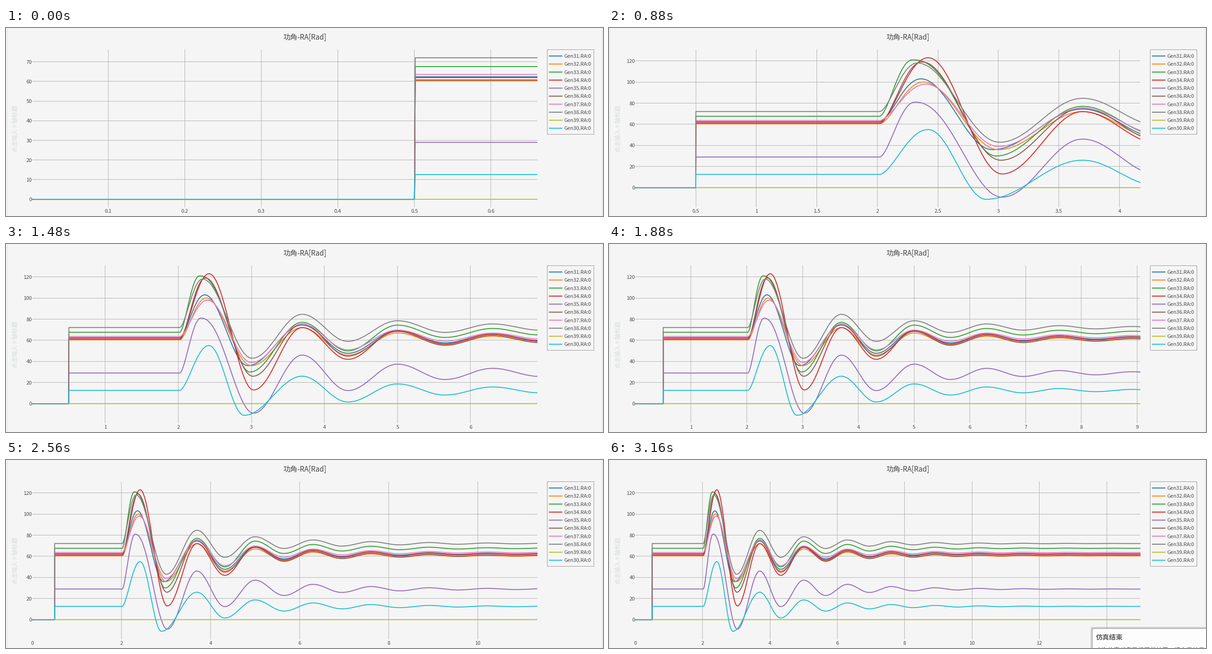
Animation, 1280 px wide and 404 px high, one loop 3240 ms. Source, as a matplotlib script:

```python
import math

import matplotlib.pyplot as plt
import numpy as np
from matplotlib.animation import FuncAnimation
from matplotlib.patches import FancyBboxPatch, Rectangle

W, H, DPI = 1280, 404, 100
PX = 72 / DPI
LEFT, RIGHT, TOP, BOTTOM = 56.5, 1138.5, 47, 385
FRAMES, LAST = 81, 79
BACK, GRID, INK = "#f5f5f5", "#b0b0b0", "#4a4a4a"

T0, STEP, FAULT = 0.001, 0.5, 2.02
SECOND_PEAK, SECOND_DIP, RINGING, HALF_PERIOD = 3.695, 4.32, 5.0, 0.65
DECAY = 0.727

# steady angle, first peak (time, angle), first dip (time, angle), second peak, second dip
GENERATORS = {
    "Gen31": (62.4, (2.36, 103), (2.95, 36), 74.4, 47.7),
    "Gen32": (60.4, (2.38, 100), (3.00, 36), 72, 46),
    "Gen33": (67.6, (2.29, 121), (2.98, 30), 77, 50),
    "Gen34": (62.0, (2.42, 123), (3.03, 13), 72, 42),
    "Gen35": (29.0, (2.31, 81), (3.03, -9), 46, 12.4),
    "Gen36": (60.8, (2.37, 119), (3.02, 26), 75.5, 45),
    "Gen37": (63.6, (2.40, 98), (3.00, 39), 75.3, 51),
    "Gen38": (72.1, (2.33, 118), (3.01, 43), 84.6, 59),
    "Gen39": (0, (2.40, 0), (3.00, 0), 0, 0),
    "Gen30": (12.6, (2.42, 55), (2.90, -11), 26, 1.6),
}


def rotor_angle(t, base, peak, dip, peak2, dip2):
    """Step up, then swing from extreme to extreme with cosine easing."""
    n = np.arange(18)
    ring = (peak2 - dip2) / 4
    times = np.r_[FAULT, peak[0], dip[0], SECOND_PEAK, SECOND_DIP, RINGING + HALF_PERIOD * n]
    angles = np.r_[base, peak[1], dip[1], peak2, dip2, base + ring * (-DECAY) ** n]
    skew = np.ones(len(times))
    skew[0] = 0.83                                # fast start after the fault
    skew[1] = 1 + 5 * max(0, 2.33 - peak[0])      # early peaks linger
    phase = np.interp(t, times, np.arange(len(times)))
    leg = np.minimum(phase.astype(int), len(times) - 2)
    ease = (1 - np.cos(np.pi * (phase - leg) ** skew[leg])) / 2
    swing = angles[leg] + (angles[leg + 1] - angles[leg]) * ease
    return np.where(t <= STEP, 0, swing)


def end_time(i):
    return np.interp(i, [0, 9, 22, 37, 47, 64, LAST],
                     [0.66, 2.21, 4.17, 6.91, 9.05, 11.33, 14.99])


def ticks(lo, hi, count):
    rough = (hi - lo) / count
    base = 10 ** math.floor(math.log10(rough))
    step = base * next(m for m in (2, 5, 10) if rough <= m * base * (1 + 1e-9))
    slack = 1e-4 * (hi - lo)
    first, last = math.ceil((lo - slack) / step), math.floor((hi + slack) / step)
    return [n * step for n in range(first, last + 1)]


fig = plt.figure(figsize=(W / DPI, H / DPI), dpi=DPI, facecolor=BACK)
plt.rcParams["font.family"] = ["Noto Sans CJK JP", "DejaVu Sans"]
ax = fig.add_axes([0, 0, 1, 1])
ax.set(xlim=(0, W), ylim=(H, 0))
ax.axis("off")


def label(x, y, text, size=11, color=INK, ha="left", **kw):
    """Text whose capitals are centred on y."""
    return ax.text(x, y + 0.366 * size, text, fontsize=size * PX, color=color,
                   ha=ha, va="baseline", **kw)


def stroke(x, y, color, width, **kw):
    return ax.plot(x, y, color=color, lw=width * PX, snap=False, **kw)[0]


for edge in (2.5, 1278.5):
    stroke([edge, edge], [0, H], "#e2e2e2", 1)
label(641, 19, "功角-RA[Rad]", 15.3, "#444444", "center")
ax.text(20, 216.5, "点击输入 Y 轴标题", fontsize=12.6 * PX, color="#d3ddd6",
        rotation=90, ha="center", va="center")

ax.add_patch(Rectangle((1160.5, 46.5), 100, 182, fc=BACK, ec="#999999", lw=PX, snap=False))
for n, name in enumerate(GENERATORS):
    y = 60.2 + 17.25 * n
    stroke([1165, 1192], [y, y], f"C{n}", 2)
    label(1196.5, y - 0.2, f"{name}.RA:0")

grid = stroke([], [], GRID, 1, zorder=1)
traces = [stroke([], [], f"C{n}", 1.9, zorder=3) for n in range(len(GENERATORS))]
x_labels = [label(0, 0, "", ha="center") for _ in range(12)]
y_labels = [label(0, 0, "", ha="right") for _ in range(12)]

popup = []
for grow in range(5, -1, -1):
    box = FancyBboxPatch((1037 - grow, 363 - grow), 300, 100, zorder=6,
                         boxstyle="round,pad=0,rounding_size=3", lw=0,
                         fc="#000000" if grow else "#fdfdfd", alpha=0.06 if grow else 1)
    popup.append(ax.add_patch(box))
popup.append(label(1044, 380.5, "仿真结束", 14.5, "#606060", weight="bold", zorder=7))
popup.append(label(1044, 407.5, "本次仿真任务已经正常结束，请查看结果。", 13, "#555555", zorder=7))


def place(pool, spots):
    for item in pool:
        item.set_text("")
    for item, (x, y, value) in zip(pool, spots):
        item.set_text(f"{round(value, 6):g}")
        item.set_position((x, y + 4))


def draw(i):
    end = end_time(i)
    t = np.unique(np.r_[np.arange(0.01, end, 0.01), T0, STEP, STEP + 0.001, end])
    curves = [rotor_angle(t, *swing) for swing in GENERATORS.values()]
    low, high = np.min(curves), np.max(curves)
    pad = (high - low) / 18
    low, high = low - pad, high + pad

    def to_x(time):
        return LEFT + (time - T0) / (end - T0) * (RIGHT - LEFT)

    def to_y(value):
        return BOTTOM - (value - low) / (high - low) * (BOTTOM - TOP)

    for trace, curve in zip(traces, curves):
        trace.set_data(to_x(t), to_y(curve))

    x_ticks, y_ticks = ticks(T0, end, 10), ticks(low, high, 9.45)
    gx, gy = [], []
    for v in x_ticks:
        if v > 0:
            x = math.floor(to_x(v)) + 0.5
            gx += [x, x, np.nan]
            gy += [TOP, BOTTOM, np.nan]
    for v in y_ticks:
        y = math.floor(to_y(v)) + 0.5
        gx += [LEFT, RIGHT, np.nan]
        gy += [y, y, np.nan]
    grid.set_data(gx, gy)
    place(x_labels, [(to_x(v), 393, v) for v in x_ticks])
    place(y_labels, [(55.5, to_y(v), v) for v in y_ticks])

    for item in popup:
        item.set_visible(i >= LAST)
    return []


anim = FuncAnimation(fig, draw, frames=FRAMES, init_func=lambda: draw(0),
                     interval=40, repeat=True, repeat_delay=0, blit=False)
plt.show()
```
